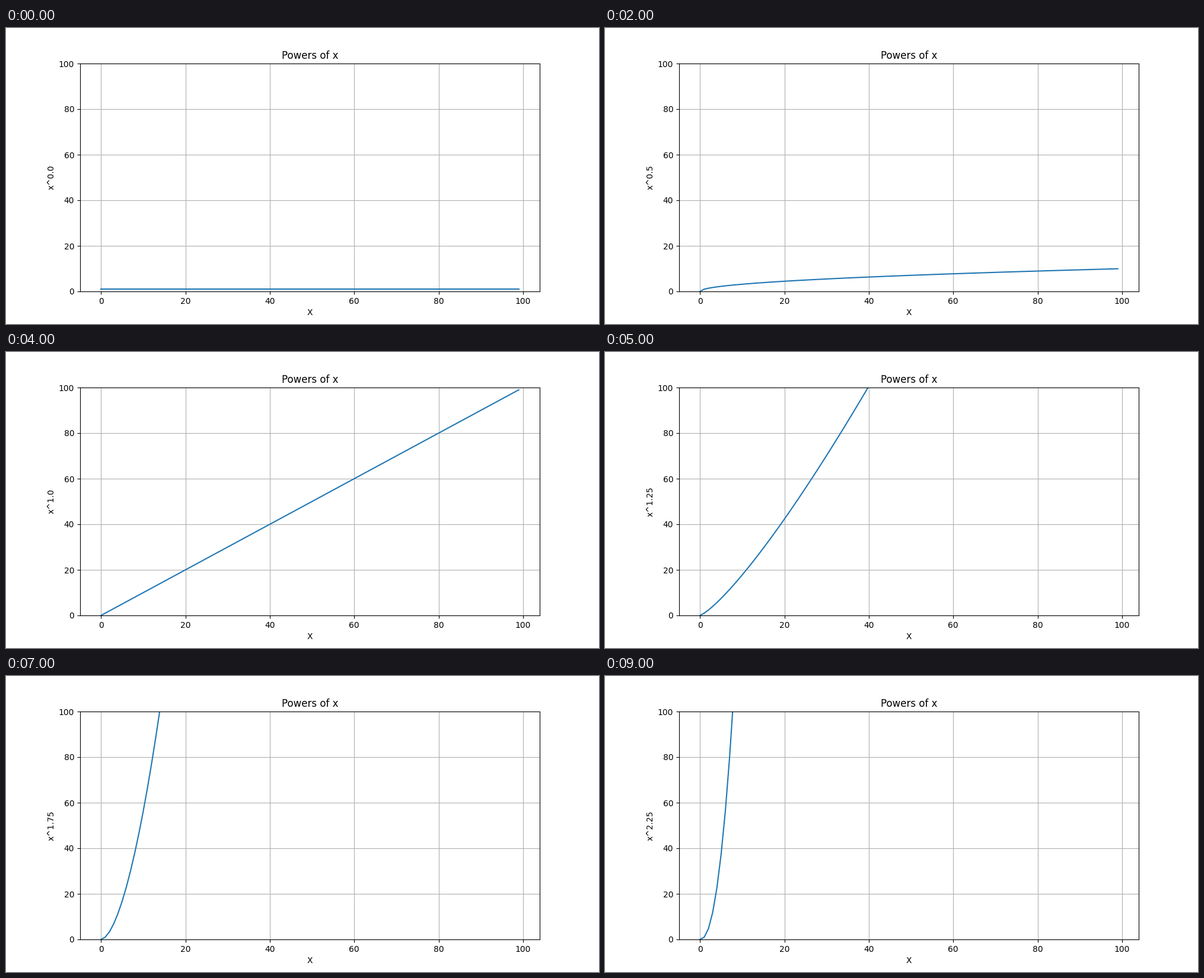
A matplotlib script that plays this animation: 1000 px wide and 500 px high, repeating every 10000 ms.

```python
import numpy as np
import matplotlib.pyplot as plt
from matplotlib.animation import FuncAnimation

STEPS = 10
POWER_STEP = 0.25

plt.rcParams["font.family"] = "DejaVu Sans"

fig, ax = plt.subplots(figsize=(10, 5), dpi=100)
x = np.arange(100.0)
line, = ax.plot(x, x ** 0)

ax.set_title("Powers of x")
ax.set_xlabel("X")
ax.set_xlim(-4.95, 103.95)
ax.set_ylim(0, 100)
ax.grid(True)


def draw(step):
    power = step * POWER_STEP
    line.set_ydata(x ** power)
    ax.set_ylabel(f"x^{power}")
    return line, ax.yaxis.label


anim = FuncAnimation(fig, draw, frames=STEPS, interval=1000,
                     repeat=True, repeat_delay=0)
plt.show()
```
